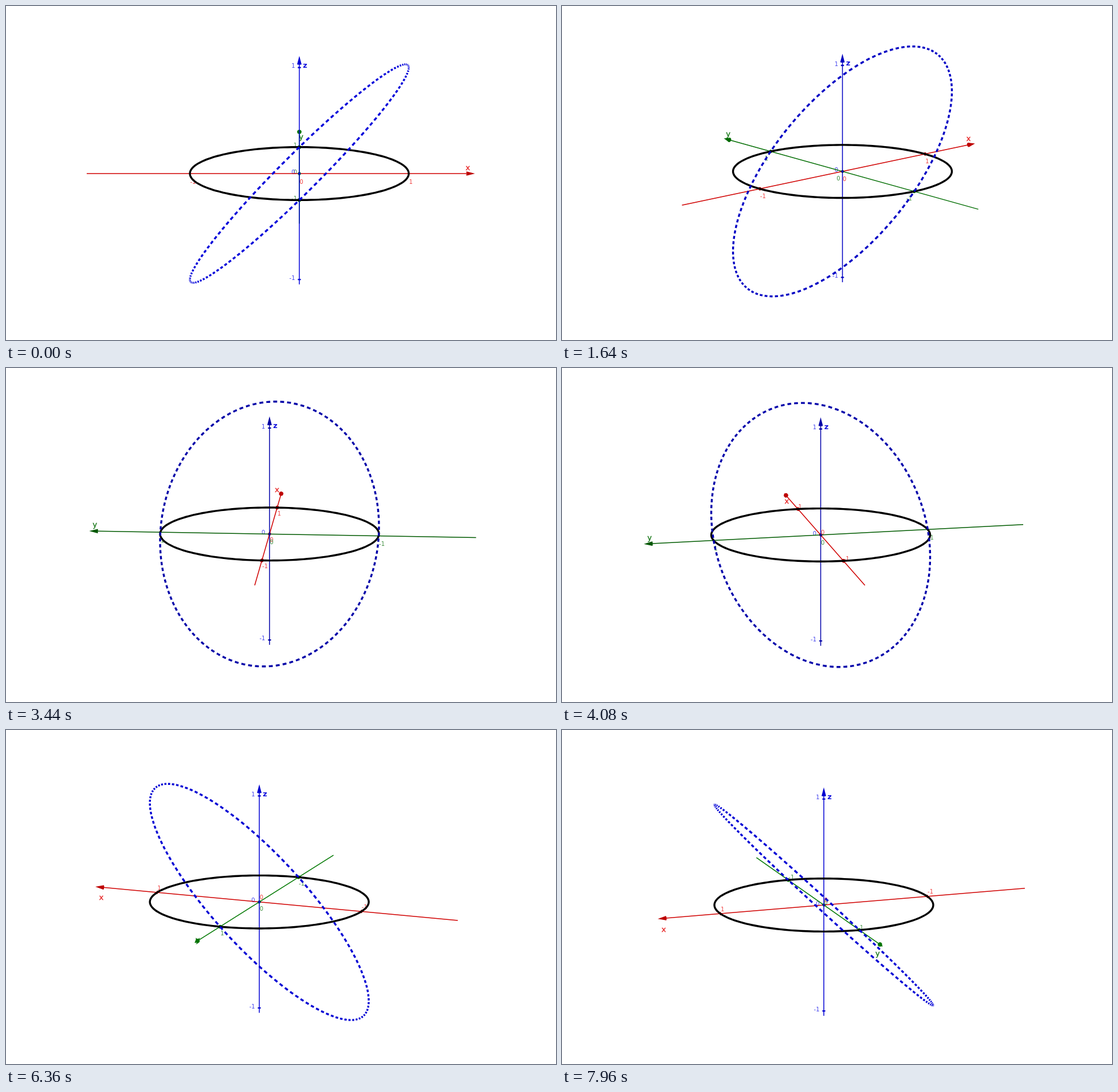
Write an HTML page with a canvas that moves like this. It is 960 by 584 pixels and loops after 8 s.

```html
<!DOCTYPE html>
<html lang="en">
<head>
<meta charset="utf-8">
<title>Rotating curves in space</title>
<style>
  html, body { margin: 0; width: 100%; height: 100%; overflow: hidden; background: #fff; }
  canvas { display: block; }
</style>
</head>
<body>
<canvas id="stage" width="960" height="584"></canvas>
<script>
const ctx = document.getElementById('stage').getContext('2d');
const LOOP = 8000, STEP = 40;
const UNIT = 191, TILT = 0.2425, RISE = Math.sqrt(1 - TILT * TILT);
const PIVOT = { x: 480, y: 298.4 };
const OFFSET = [32 / UNIT, 22.3 / UNIT, 0];
const HEAD = 15 / UNIT;
const DASHES = 120, DASH_FILL = 0.56;

let cos = 1, sin = 0;

// Orthographic view of a direction, turned about the vertical axis.
const turn = ([x, y, z]) => [
  UNIT * (x * cos - y * sin),
  -UNIT * (TILT * (x * sin + y * cos) + RISE * z)
];
function project([x, y, z]) {
  const [px, py] = turn([x + OFFSET[0], y + OFFSET[1], z]);
  return [PIVOT.x + px, PIVOT.y + py];
}

const flatCircle = a => [Math.cos(a), Math.sin(a), 0];
const tiltedCircle = a => [Math.cos(a), Math.sin(a), Math.cos(a)];

// Angles at equal distances along the tilted curve, for even dashes in space.
const dashAngles = (() => {
  const n = 3600, da = 2 * Math.PI / n, lengths = [0];
  for (let i = 0; i < n; i++) {
    const s = Math.sin((i + 0.5) * da);
    lengths.push(lengths[i] + Math.sqrt(1 + s * s) * da);
  }
  let i = 0;
  const angleAt = d => {
    while (i < n && lengths[i + 1] < d) i++;
    return (i + (d - lengths[i]) / (lengths[i + 1] - lengths[i])) * da;
  };
  const period = lengths[n] / DASHES;
  return Array.from({ length: DASHES }, (_, k) =>
    [angleAt(k * period), angleAt((k + DASH_FILL) * period)]);
})();

function trace(curve, from, to, steps) {
  for (let i = 0; i <= steps; i++) {
    const p = project(curve(from + (to - from) * i / steps));
    if (i) ctx.lineTo(...p); else ctx.moveTo(...p);
  }
}

function strokePath(color, width, build) {
  ctx.strokeStyle = color;
  ctx.lineWidth = width;
  ctx.beginPath();
  build();
  ctx.stroke();
}

const positive = v => v > 1e-9;

// Label placement depends on which way each axis points on screen.
const numberDrop = v => positive(v) ? 10 + 4 * v : -3 + 5.5 * v;

function axes() {
  const blue = Math.round(168 + 50 * cos * cos);
  const green = Math.round(90 + 34 * cos * cos);
  return [
    { name: 'x', dir: [1, 0, 0], from: -1.943, to: 1.605,
      line: '#d00000', head: '#be0000', text: '#f04040', title: '#e62020', align: 'left',
      number: [0.5, numberDrop(cos)],
      label: positive(cos) ? [-8 - 4.5 * cos, -2 - 8 * cos] : [3 - 8 * cos, 13 - 6.3 * cos] },
    { name: 'y', dir: [0, 1, 0], from: -1.892, to: 1.652,
      line: `rgb(0,${green},0)`, head: `rgb(0,${green - 4},0)`, text: '#409040', title: '#187818',
      align: cos > Math.SQRT1_2 ? 'right' : 'left',
      number: [cos > Math.SQRT1_2 ? -4 : 0.5, numberDrop(sin)],
      label: [sin < -1e-9 ? -8 + 3 * sin : 3 + 7 * sin,
              positive(sin) ? -2 - 8.5 * sin : 12.5 - 2 * sin] },
    { name: 'z', dir: [0, 0, 1], from: -1.046, to: 1.11,
      line: `rgb(0,0,${blue})`, head: `rgb(0,0,${blue - 4})`, text: '#4444ee', title: '#1010dc',
      align: 'right', number: [-7.5, -3], label: [10, 17] }
  ];
}

const along = (axis, d) => project(axis.dir.map(v => v * d));

function write(text, [x, y], [dx, dy], align) {
  ctx.textAlign = align;
  ctx.fillText(text, x + dx, y + dy);
}

function drawLabels(axis) {
  ctx.textBaseline = 'alphabetic';
  ctx.fillStyle = axis.text;
  ctx.font = '10px "DejaVu Sans", sans-serif';
  const [dx, dy] = axis.number;
  for (const n of [-1, 0, 1]) write(String(n), along(axis, n), [dx, dy + 3.6], axis.align);
  ctx.fillStyle = axis.title;
  ctx.font = `${axis.name === 'z' ? 'bold ' : ''}13px "DejaVu Sans", sans-serif`;
  const [lx, ly] = axis.label;
  write(axis.name, along(axis, axis.to), [lx, ly + 3.7], 'center');
  if (axis.name !== 'z') {
    ctx.strokeStyle = axis.title;
    ctx.lineWidth = 0.35;
    const [x, y] = along(axis, axis.to);
    ctx.strokeText(axis.name, x + lx, y + ly + 3.7);
  }
}

// A round disc facing along the axis.
function disc(axis, d, radius, edge) {
  const [ux, uy] = turn(axis.dir);
  const seen = Math.min(1, Math.hypot(ux, uy) / UNIT);
  const [x, y] = along(axis, d);
  ctx.beginPath();
  ctx.ellipse(x, y, radius * Math.sqrt(1 - seen * seen) + edge, radius,
    Math.atan2(uy, ux), 0, 2 * Math.PI);
  ctx.fill();
}

function drawAxis(axis) {
  const start = along(axis, axis.from), tip = along(axis, axis.to);
  const base = along(axis, axis.to - HEAD);
  strokePath(axis.line, 1.5, () => { ctx.moveTo(...start); ctx.lineTo(...base); });

  ctx.fillStyle = axis.head;
  for (const n of [-1, 0, 1]) disc(axis, n, n ? 3 : 2.5, 0.6);
  disc(axis, axis.to - HEAD, 3.8, 0);

  const angle = Math.atan2(tip[1] - base[1], tip[0] - base[0]);
  const nx = -Math.sin(angle) * 3.8, ny = Math.cos(angle) * 3.8;
  ctx.beginPath();
  ctx.moveTo(...tip);
  ctx.lineTo(base[0] + nx, base[1] + ny);
  ctx.lineTo(base[0] - nx, base[1] - ny);
  ctx.fill();
}

function draw(time) {
  const angle = Math.floor((time % LOOP) / STEP) * Math.PI / 180;
  cos = Math.cos(angle);
  sin = Math.sin(angle);
  ctx.fillStyle = '#fff';
  ctx.fillRect(0, 0, 960, 584);

  const list = axes();
  list.forEach(drawLabels);
  list.forEach(drawAxis);
  strokePath('#000', 3.4, () => trace(flatCircle, 0, 2 * Math.PI, 180));
  strokePath(list[2].line, 3.4, () => {
    for (const [from, to] of dashAngles) trace(tiltedCircle, from, to, 3);
  });
}

const begin = performance.now();
function tick() {
  draw(performance.now() - begin);
  requestAnimationFrame(tick);
}
tick();
</script>
</body>
</html>
```
